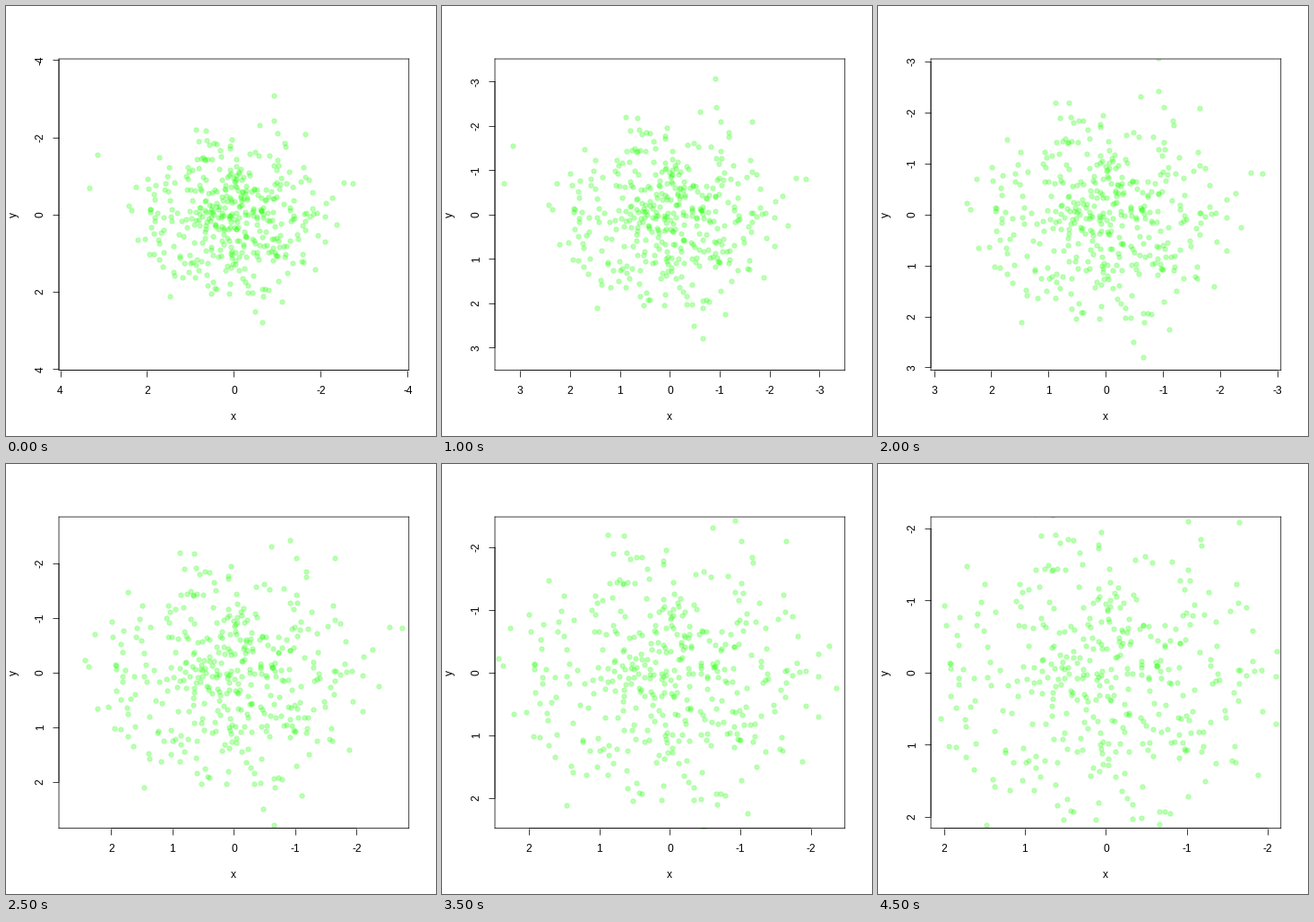
A matplotlib script for the animation above (5000 ms loop, 480x480 px).

```python
import numpy as np
import matplotlib.pyplot as plt
from matplotlib.animation import FuncAnimation

SIZE, DPI = 480, 72            # one point equals one pixel
FRAMES, INTERVAL = 10, 500
LINE = 14.4                    # height of a margin line
STROKE = 0.75
LEFT, RIGHT = 4.1 * LINE, SIZE - 2.1 * LINE
BOTTOM, TOP = 5.1 * LINE, SIZE - 4.1 * LINE
GREEN = (0.2, 1.0, 0.1, 0.33)

plt.rcParams.update({"font.family": "Liberation Sans", "font.size": 12})

# The few points that stand clear of the cloud
STRAYS = [(3.33, -.70), (3.15, -1.55), (-.91, -3.07), (-.92, -2.42),
          (-.60, -2.31), (-1.64, -2.09), (-2.53, -.83), (-2.73, -.81),
          (2.43, -.22), (1.47, 2.11), (-.65, 2.79), (-.48, 2.50),
          (-1.10, 2.25), (-2.36, .25)]


def cloud(n, limit, seed):
    """Normal cloud cut off at a given radius."""
    rng = np.random.default_rng(seed)
    share = 1 - np.exp(-limit ** 2 / 2)
    r = np.sqrt(-2 * np.log(1 - share * rng.random(n)))
    a = 2 * np.pi * rng.random(n)
    return np.column_stack([r * np.cos(a), r * np.sin(a)])


points = np.vstack([STRAYS, cloud(395, 2.4, 12)])

fig = plt.figure(figsize=(SIZE / DPI, SIZE / DPI), dpi=DPI, facecolor="white")
ax = fig.add_axes([LEFT / SIZE, BOTTOM / SIZE,
                   (RIGHT - LEFT) / SIZE, (TOP - BOTTOM) / SIZE])
ax.scatter(points[:, 0], points[:, 1], s=5.4 ** 2, c=[GREEN],
           edgecolors=[GREEN], linewidths=STROKE)
for spine in ax.spines.values():
    spine.set(linewidth=STROKE, snap=False)
ax.tick_params(length=LINE / 2, width=STROKE)
ax.tick_params(axis="x", pad=19)
ax.tick_params(axis="y", pad=10)

# Axis lines drawn over the box, from the first tick to the last
line_style = dict(color="black", lw=STROKE, snap=False, clip_on=False,
                  solid_capstyle="butt", zorder=3)
x_line, = ax.plot([], [], transform=ax.get_xaxis_transform(), **line_style)
y_line, = ax.plot([], [], transform=ax.get_yaxis_transform(), **line_style)

anchored = dict(ha="center", va="baseline", rotation_mode="anchor")
fig.text(((LEFT + RIGHT) / 2 - 0.4) / SIZE, (BOTTOM - 3.85 * LINE) / SIZE,
         "x", **anchored)
fig.text((LEFT - 3.25 * LINE) / SIZE, (BOTTOM + TOP) / 2 / SIZE, "y",
         rotation=90, **anchored)


def update(i):
    half = 4.32 * 2 ** (-(i + 1) / 10)
    step = 2 if half > 3.89 else 1
    ticks = [v for v in range(-4, 5, step) if abs(v) <= half]
    names = [str(v) for v in ticks]
    ends = [ticks[0], ticks[-1]]
    ax.set_xticks(ticks, names, **anchored)
    ax.set_yticks(ticks, names, rotation=90, **anchored)
    for axis in (ax.xaxis, ax.yaxis):
        for mark in axis.get_ticklines():
            mark.set_snap(False)
    x_line.set_data(ends, [0, 0])
    y_line.set_data([0, 0], ends)
    ax.set_xlim(half, -half)
    ax.set_ylim(half, -half)
    return []


anim = FuncAnimation(fig, update, frames=FRAMES, interval=INTERVAL,
                     init_func=lambda: update(0), repeat=True,
                     repeat_delay=0, blit=False)
plt.show()
```
